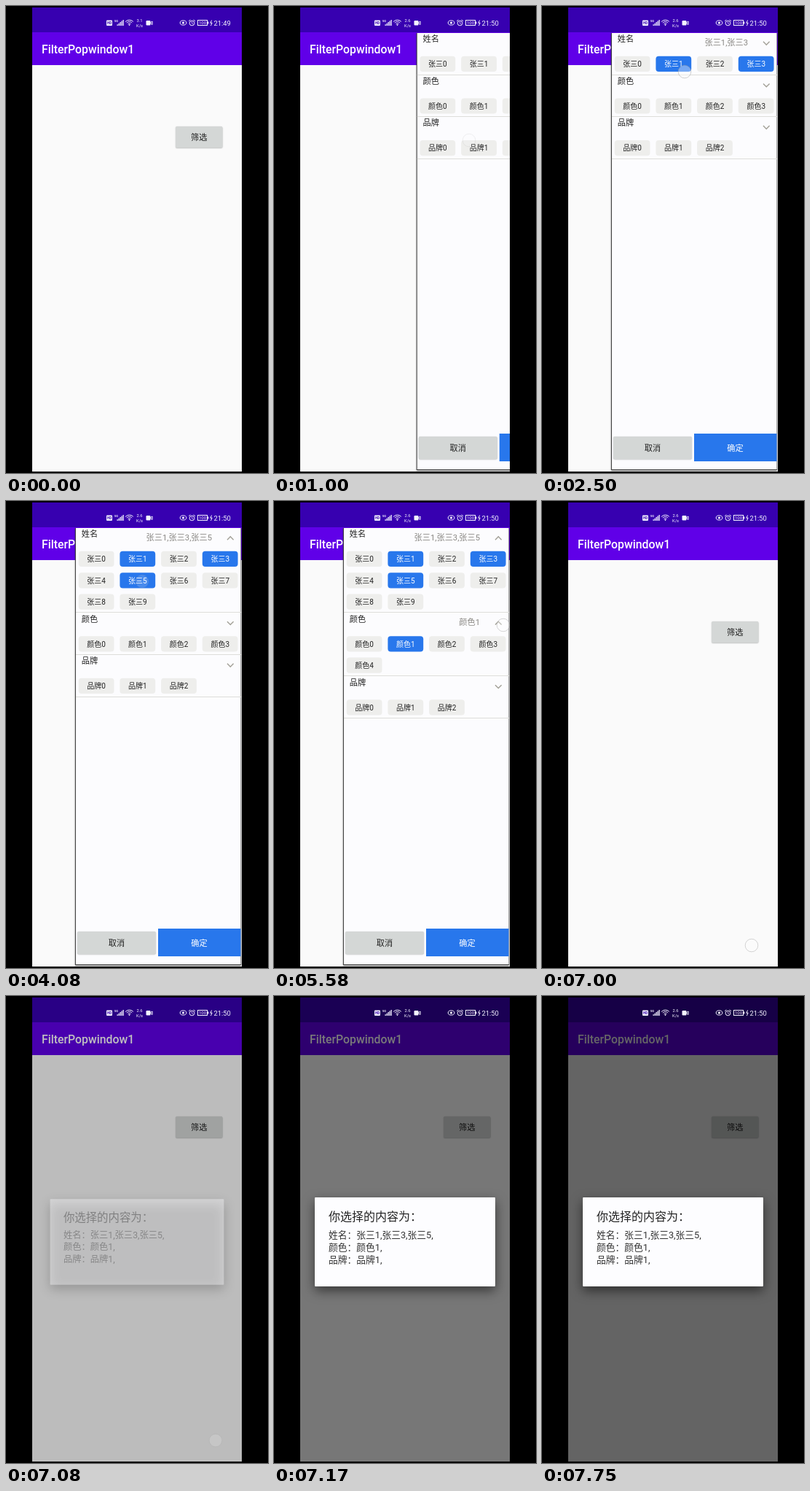
Recreate the animation shown at these times as an HTML page with a canvas. Size 360 by 640 pixels, loop 8000 ms.

```html
<!DOCTYPE html>
<html lang="zh-CN">
<head>
<meta charset="utf-8">
<title>FilterPopwindow1</title>
<style>
  html, body { margin: 0; width: 100%; height: 100%; overflow: hidden; background: #000; }
  canvas { display: block; width: 360px; height: 640px; }
</style>
</head>
<body>
<canvas id="stage"></canvas>
<script>
const LOOP = 8000;
const FONT = 'Roboto, "Noto Sans CJK SC", "Noto Sans CJK JP", "Noto Sans CJK", sans-serif';
const BLUE = '#2877ec', BUTTON = '#d4d7d6', INK = '#222', STATUS = '#3700b0';
const canvas = document.getElementById('stage');
const ctx = canvas.getContext('2d');
const ratio = window.devicePixelRatio || 1;
canvas.width = 360 * ratio;
canvas.height = 640 * ratio;

const POPUP_OPEN = 900, POPUP_CLOSE = 6850, DIALOG_OPEN = 7030;

// picks: [option index, time it becomes selected]
const sections = [
  { name: '姓名', option: '张三', count: 10, expandAt: 2870, picks: [[1, 2440], [3, 1950], [5, 3920]] },
  { name: '颜色', option: '颜色', count: 5, expandAt: 5520, picks: [[1, 4840]] },
  { name: '品牌', option: '品牌', count: 3, expandAt: Infinity, picks: [[1, 6110]] }
];

const taps = [
  { down: 670, up: 820, x: 268, y: 184 },
  { down: 1830, up: 1950, x: 295, y: 84 },
  { down: 2330, up: 2440, x: 196, y: 90 },
  { down: 2750, up: 2870, x: 310, y: 54 },
  { down: 3750, up: 3920, x: 187, y: 110 },
  { down: 4670, up: 4840, x: 187, y: 199 },
  { down: 5410, up: 5500, x: 315, y: 170 },
  { down: 6000, up: 6110, x: 187, y: 286 },
  { down: 6750, up: 6920, x: 288, y: 609 }
];

const progress = (t, start, length) => Math.min(1, Math.max(0, (t - start) / length));
const easeOut = p => 1 - (1 - p) ** 2;

function rect(x, y, w, h, color, radius = 0) {
  ctx.fillStyle = color;
  ctx.beginPath();
  ctx.roundRect(x, y, w, h, radius);
  ctx.fill();
}

function line(points, color, width = 1) {
  ctx.strokeStyle = color;
  ctx.lineWidth = width;
  ctx.beginPath();
  points.forEach(([x, y]) => ctx.lineTo(x, y));
  ctx.stroke();
}

function disc(x, y, r, fill, stroke, width = 1) {
  ctx.beginPath();
  ctx.arc(x, y, r, 0, 7);
  if (fill) { ctx.fillStyle = fill; ctx.fill(); }
  if (stroke) { ctx.strokeStyle = stroke; ctx.lineWidth = width; ctx.stroke(); }
}

// y is the visual middle of the text
function text(value, x, y, size, color, align = 'left', weight = 400) {
  ctx.font = `${weight} ${size}px ${FONT}`;
  ctx.textAlign = align;
  ctx.fillStyle = color;
  ctx.fillText(value, x, y + size * 0.37);
}

function withShadow(blur, offset, color, draw) {
  ctx.save();
  ctx.shadowBlur = blur * ratio;
  ctx.shadowOffsetY = offset * ratio;
  ctx.shadowColor = color;
  draw();
  ctx.restore();
}

function button(label, x, y, w, h) {
  withShadow(1.5, 0.6, '#0004', () => rect(x, y, w, h, BUTTON, 2));
  text(label, x + w / 2, y + h / 2 + 0.2, 11.2, INK, 'center', 500);
}

function drawPage() {
  rect(36, 2, 288, 34, STATUS);
  rect(36, 36, 288, 45, '#6000e8');
  rect(36, 81, 288, 557, '#fafafa');
  text('FilterPopwindow1', 49, 59, 15.8, '#fff', 'left', 500);
  button('筛选', 233, 165, 64.5, 29.5);
}

function drawStatusIcons(t) {
  const white = '#f4f4ff';
  rect(138, 19.5, 8, 7.5, white, 1);
  text('HD', 142, 23.3, 4.5, STATUS, 'center', 700);
  text('5G', 149, 20.5, 4, white, 'left', 700);
  for (let i = 0; i < 5; i++) rect(152.5 + i * 2, 25.3 - i * 1.6, 1.3, 1.7 + i * 1.6, white);
  for (const r of [2.6, 5, 7.3]) {
    ctx.beginPath();
    ctx.arc(169.5, 26.5, r, -2.4, -0.74);
    ctx.strokeStyle = white;
    ctx.lineWidth = 1;
    ctx.stroke();
  }
  disc(169.5, 26, 0.9, white);
  text(t < 80 ? '3.1' : '2.6', 183.5, 20.3, 5.8, white, 'center');
  text('K/s', 183.5, 27, 5.8, white, 'center');
  rect(192.5, 20, 6, 6.5, white, 1.2);
  line([[198, 23.2], [201, 21], [201, 25.5], [198, 23.2]], white);

  ctx.beginPath();
  ctx.ellipse(243.5, 23, 4.3, 3.1, 0, 0, 7);
  ctx.strokeStyle = white;
  ctx.lineWidth = 1;
  ctx.stroke();
  disc(243.5, 23, 1.6, white);
  disc(255.5, 23.5, 3.3, null, white);
  line([[255.5, 21.5], [255.5, 23.7], [257, 24.5]], white, 0.8);
  line([[251.2, 20.7], [253.4, 18.8]], white);
  line([[257.6, 18.8], [259.8, 20.7]], white);
  ctx.strokeRect(263.5, 19.5, 13, 7);
  rect(277, 21.5, 1.3, 3, white);
  text('100', 270, 23.1, 6, white, 'center');
  line([[282.6, 19.5], [280.8, 23.3], [283.2, 23], [281.4, 27]], white);
  text(t < 1000 ? '21:49' : '21:50', 285.5, 23.2, 9.4, white);
}

function drawSection(section, top, t) {
  const { name, option, count, expandAt, picks } = section;
  const expanded = t >= expandAt;
  const chosen = picks.filter(pick => t >= pick[1]).map(pick => pick[0]);
  const shown = expanded ? count : Math.min(4, count);

  text(name, 103.7, top + 8, 11.2, INK);
  text(chosen.map(i => option + i).join(','), 283, top + 12.5, 11.2, '#8a8884', 'right');
  const bend = expanded ? -2.2 : 2.2, middle = top + 14;
  line([[304, middle - bend], [308.3, middle + bend], [312.6, middle - bend]], '#a3a198', 1.4);

  for (let i = 0; i < shown; i++) {
    const x = 99.7 + (i % 4) * 56.7;
    const y = top + 42.4 + Math.floor(i / 4) * 29.4;
    const on = chosen.includes(i);
    rect(x, y - 10.6, 48.8, 21.2, on ? BLUE : '#eeeeec', 4);
    text(option + i, x + 24.4, y, 10, on ? '#fff' : INK, 'center');
  }
  const bottom = top + 57.6 + (Math.ceil(shown / 4) - 1) * 29.4;
  rect(96, Math.round(bottom) - 1, 227, 1, '#dededa');
  return bottom;
}

function drawPopup(t) {
  const shown = easeOut(progress(t, POPUP_OPEN, 300)) - progress(t, POPUP_CLOSE, 140);
  if (shown <= 0) return;
  ctx.save();
  ctx.beginPath();
  ctx.rect(36, 2, 288, 636);
  ctx.clip();
  ctx.translate((1 - shown) * 229, 0);
  withShadow(2, 0.5, '#0008', () => rect(95, 37, 228, 599, '#444'));
  rect(96, 37, 226.5, 598, '#fcfcfe');
  sections.reduce((top, section) => drawSection(section, top, t), 37);
  button('取消', 98, 590, 108, 31);
  rect(209, 586, 113.5, 38, BLUE);
  text('确定', 265.5, 605.5, 11.2, '#fff', 'center', 500);
  ctx.restore();
}

function drawDim(t) {
  const dim = 0.6 * easeOut(progress(t, DIALOG_OPEN, 220));
  rect(36, 2, 288, 636, `rgba(0,0,0,${dim})`);
}

function drawDialog(t) {
  const shown = progress(t, DIALOG_OPEN, 130);
  if (!shown) return;
  const scale = 0.9 + 0.1 * easeOut(shown);
  ctx.save();
  ctx.globalAlpha = shown;
  ctx.translate(180, 337);
  ctx.scale(scale, scale);
  ctx.translate(-180, -337);
  withShadow(16, 6, '#0008', () => rect(56, 276, 248, 122, '#fdfdff', 1));
  text('你选择的内容为：', 75, 302, 16, INK, 'left', 500);
  sections.forEach(({ name, option, picks }, i) => {
    const list = picks.map(pick => option + pick[0] + ',').join('');
    text(`${name}：${list}`, 75, 327 + i * 17, 12.75, '#333');
  });
  ctx.restore();
}

function drawTaps(t) {
  for (const { down, up, x, y } of taps) {
    if (t < down) continue;
    ctx.globalAlpha = 1 - progress(t, up, 230);
    if (ctx.globalAlpha > 0) disc(x, y, 8.8, 'rgba(255,255,255,.5)', 'rgba(150,150,150,.6)');
  }
  ctx.globalAlpha = 1;
}

function draw(now) {
  const t = now % LOOP;
  ctx.setTransform(ratio, 0, 0, ratio, 0, 0);
  rect(0, 0, 360, 640, '#000');
  drawPage();
  drawDim(t);
  drawPopup(t);
  drawStatusIcons(t);
  drawDialog(t);
  drawTaps(t);
}

const start = performance.now();
function frame() {
  draw(performance.now() - start);
  requestAnimationFrame(frame);
}
frame();
</script>
</body>
</html>
```
